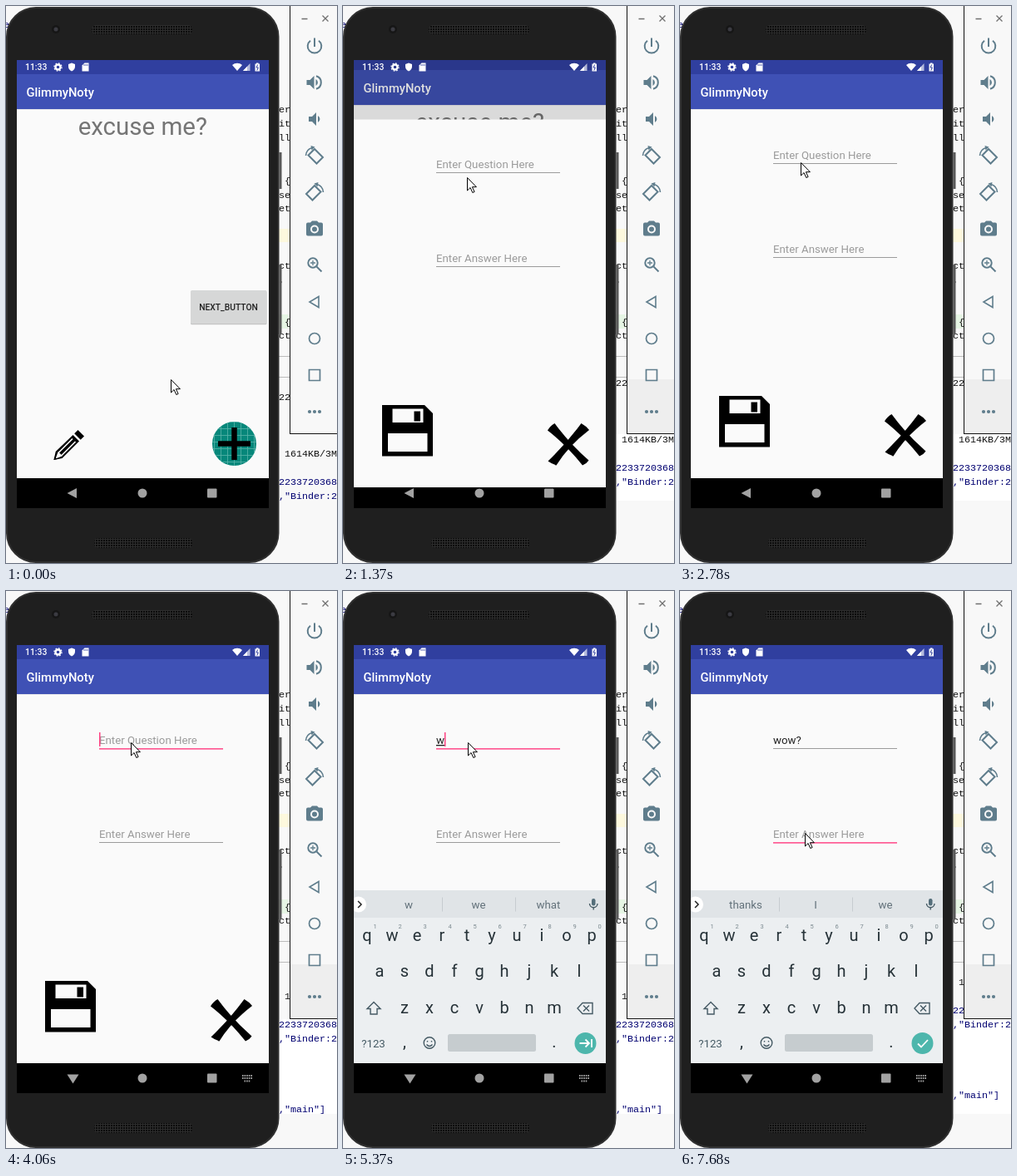
An HTML page for the animation above (8 s loop, 398 px wide and 670 px high).

```html
<!DOCTYPE html>
<html lang="en">
<head>
<meta charset="utf-8">
<title>Flash card emulator</title>
<style>
html, body { margin: 0; width: 100%; height: 100%; overflow: hidden; background: #f8f8f8; }
svg { display: block; width: 100vw; height: 100vh; font-family: Roboto, sans-serif; }
.mono { font: 11.7px "Liberation Mono", monospace; fill: #111; white-space: pre; }
.navy { fill: #000070; }
.mid { text-anchor: middle; }
.bold { font-weight: 500; }
.field { font-size: 13.26px; fill: #9b9b9b; }
.line { fill: none; stroke-width: 2; }
.keys { font-size: 20px; fill: #263238; }
</style>
</head>
<body>
<svg viewBox="0 0 398 670" preserveAspectRatio="none">
  <defs>
    <clipPath id="screen"><rect x="13" y="65" width="303" height="539"/></clipPath>
    <clipPath id="reveal"><rect id="revealBox" x="13" y="65" width="303" height="539"/></clipPath>
    <clipPath id="console"><rect x="320" y="447" width="78" height="200"/></clipPath>
    <clipPath id="disc"><circle cx="274.5" cy="526.5" r="26.5"/></clipPath>
    <pattern id="mesh" width="3" height="3" patternUnits="userSpaceOnUse">
      <rect width="3" height="3" fill="#2c2c2c"/><rect width="2" height="2" fill="#0c0c0c"/>
    </pattern>
    <pattern id="grid" x="2" y="4" width="8" height="8" patternUnits="userSpaceOnUse">
      <path d="M0 .5H8M.5 0V8" stroke="#58b3a8" stroke-width=".8"/>
    </pattern>
  </defs>

  <rect width="398" height="670" fill="#f8f8f8"/>
  <rect id="paper" x="300" y="515" width="98" height="80" fill="#fff"/>
  <rect x="320" y="268" width="24" height="16" fill="#fdf8dd"/>
  <rect x="320" y="371" width="24" height="17" fill="#e6f5e4"/>
  <path d="M320 421.5h24M320 446.5h24" stroke="#bbb"/>
  <g id="code"></g>
  <g clip-path="url(#console)"><g id="log"></g></g>
  <text class="mono navy" x="-3" y="26">e</text>

  <!-- phone body -->
  <path d="M330 176v44M330 311v84" stroke="#5a5a5a" stroke-width="3"/>
  <rect x="1" y="2" width="326.5" height="667" rx="35" fill="#1f1f1f" stroke="#303030" stroke-width="2"/>
  <circle cx="60" cy="28" r="5" fill="#161616"/><circle cx="60" cy="28" r="2.5" fill="#3b3b42"/>
  <rect x="103" y="23" width="121" height="11" rx="5" fill="url(#mesh)"/>
  <rect x="106" y="640" width="118" height="12" rx="5" fill="url(#mesh)"/>

  <g clip-path="url(#screen)">
    <rect x="13" y="65" width="303" height="539"/>
    <g id="deck"></g>
    <rect id="dim" x="13" y="65" width="303" height="503"/>
    <g clip-path="url(#reveal)"><g id="form"></g></g>
    <g id="keyboard"></g>
    <g id="navIcons">
      <path id="back"/>
      <circle cx="164" cy="586" r="5.5"/>
      <rect x="242" y="580.5" width="11.5" height="11" rx="1"/>
      <path id="imeIcon" d="M284 583h12M284 586h12M286.5 589.5h7" stroke="#a2a2a2" stroke-width="1.8" stroke-dasharray="1.6 1"/>
    </g>
    <g fill="#fff">
      <text class="bold" x="23" y="77.3" font-size="10.4">11:33</text>
      <circle cx="62.5" cy="73.5" r="3" fill="none" stroke="#fff" stroke-width="2.4"/>
      <circle cx="62.5" cy="73.5" r="4.6" fill="none" stroke="#fff" stroke-width="1.2" stroke-dasharray="1.8 1.8"/>
      <path d="M79 68.5l4 1.6v3c0 2.5-1.6 4.4-4 5.4-2.4-1-4-2.9-4-5.4v-3z"/>
      <path d="M94.5 68.5h5v10h-8v-7z"/>
      <path d="M94 70v2M96 70v2M98 70v2" stroke="#303f9f" stroke-width=".8"/>
      <path d="M278 78l-6-7a9 9 0 0 1 12 0z"/>
      <path d="M285 78h8.5v-9z" opacity=".65"/><path d="M285 78h5v-5.3z"/>
      <path d="M299.5 69.5h1.5v-1h2.5v1h1.5v9h-5.5z"/>
      <path d="M302.7 70.5l-1.7 3.5h2.4l-1.6 3.5" fill="none" stroke="#303f9f"/>
    </g>
  </g>

  <!-- emulator toolbar -->
  <rect x="341.5" y="-1" width="60" height="515.5" fill="#f8f8f8" stroke="#111"/>
  <rect id="shade" x="342" y="449" width="56" height="65" fill="#eee"/>
  <path d="M355.5 15.5h7M380.5 11.5l7 7m0-7l-7 7" stroke="#707070" stroke-width="1.3"/>
  <g id="tools" fill="#5f7d8c" stroke="#5f7d8c" stroke-width="0"></g>

  <path id="mouse" d="M.5.5v15.5l3.6-3.5 2.7 6 2.3-1-2.7-5.8h5z" fill="#fff" stroke="#000"/>
</svg>
<script>
const $ = id => document.getElementById(id);
const set = (id, attrs) => { for (const k in attrs) $(id).setAttribute(k, attrs[k]); };
const show = (id, on) => set(id, { visibility: on ? 'visible' : 'hidden' });
const text = (x, y, s, cls = '', more = '') => `<text x="${x}" y="${y}" class="${cls}" ${more}>${s}</text>`;
const box = (x, y, w, h, fill, rx = 0) => `<rect x="${x}" y="${y}" width="${w}" height="${h}" fill="${fill}" rx="${rx}"/>`;
const path = (d, more = '') => `<path d="${d}" ${more}/>`;

const appFrame = box(13, 65, 303, 17, '#303f9f') + box(13, 123, 303, 445, '#fafafa') +
  box(13, 124, 303, 1, '#e6e6ea') + box(13, 82, 303, 42, '#3f51b5') +
  text(24.5, 108.5, 'GlimmyNoty', 'bold', 'font-size="14.74" fill="#fff"');

$('deck').innerHTML = appFrame +
  text(164.3, 155, 'excuse me?', 'mid', 'font-size="29.5" fill="#757575"') +
  box(222, 343, 91.5, 40.3, '#c4c4c4', 1.5) + box(222, 342, 91.5, 40, '#d6d7d7', 1.5) +
  text(267.5, 366, 'NEXT_BUTTON', 'mid bold', 'font-size="10.3" fill="#212121"') +
  path('M86.5 510l7.5 7.5-4.3 4.3-7.5-7.5zM80.5 516l7.5 7.5-20.5 20.5-10 2 2.2-10z') +
  path('M63 537.5l17-17M66.5 541l17-17M61 543l2-5.5 3.5 3.5z', 'stroke="#fafafa" stroke-width="1.7" fill="#fafafa"') +
  path('M57.5 546l1-4 3 3z') +
  '<g clip-path="url(#disc)">' + box(247, 499, 55, 55, '#07877a') + box(247, 499, 55, 55, 'url(#grid)') + '</g>' +
  path('M255 526.5h39M274.5 507v39', 'stroke="#000" stroke-width="6.5"');

const field = (id, y, hint) =>
  text(112, y, hint, 'field', `id="${id}Text"`) + box(112, y + 5, 149, 1, '#9b9b9b').replace('<rect', `<rect id="${id}Line"`);

$('form').innerHTML = appFrame +
  field('ask', 184, 'Enter Question Here') + field('reply', 297, 'Enter Answer Here') +
  '<rect id="caret" width="1.5" height="17" fill="#ff4081"/>' +
  path('M47 469h51l10 10v51.5h-61z') + box(59.5, 473.5, 37, 16.5, '#fafafa') + box(85.5, 476.5, 7.5, 12, '#000') +
  box(54, 503, 47.5, 22, '#fafafa') +
  path('M254.5 491q-5 2.5-8.5 8.5 22 17 42 42 5-2 7.5-6-23-20-41-44.500z') +
  path('M286.5 491q5.500 3 9.500 8-25 19-39.500 42.500-5-1.500-10-5 22-21 40-45.500z');

// Keyboard
const row = (letters, x, y) => [...letters].map((c, i) => text(x + 30 * i, y, c, 'mid keys')).join('');
const digits = [...'1234567890'].map((c, i) =>
  text(38.5 + 30 * i, 406, c, 'mid', 'font-size="7.5" fill="#7b898f"')).join('');
const stroked = 'fill="none" stroke="#455a64" stroke-width="1.4"';
$('keyboard').innerHTML = box(13, 360, 303, 208, '#eceff1') + box(13, 360, 303, 33, '#e0e4e7') +
  '<circle cx="18.5" cy="377" r="9.5" fill="#fff"/>' + path('M18 373l4 4-4 4', 'fill="none" stroke="#222" stroke-width="1.5"') +
  path('M119.5 368.5v17M207.5 368.5v17', 'stroke="#c6ccd0"') +
  [79, 163, 247].map((x, i) => text(x, 381.8, '', 'mid', `id="hint${i}" font-size="13.3" fill="#62717a"`)).join('') +
  box(299, 370, 4.5, 8.5, '#546e7a', 2.2) + path('M296.5 376a4.7 4.7 0 0 0 9.5 0M301.2 380.5v3', stroked) +
  row('qwertyuiop', 29, 420.5) + digits + row('asdfghjkl', 44, 464) + row('zxcvbnm', 74, 508) +
  path('M37 494.5l-8 8h4v6.5h8v-6.5h4z', stroked) +
  path('M288 495.5h12v13h-12l-6-6.5zM289 498.5l7 7m0-7l-7 7', stroked) +
  text(36.5, 548.5, '?123', 'mid', 'font-size="13.3" fill="#455a64"') +
  text(74, 549, ',', 'mid keys') + text(254, 549, '.', 'mid keys') +
  `<circle cx="104" cy="543.5" r="6.8" ${stroked}/>` +
  path('M101.5 541v1.5M106.5 541v1.5M100.5 545.5q3.5 4 7 0', stroked) +
  box(126, 533, 106, 21, '#c6cccf', 2.5) +
  '<circle cx="291.5" cy="544" r="13" fill="#4db6ac"/>' +
  path('', 'id="enter" fill="none" stroke="#fff" stroke-width="1.8"');

// Editor and console scraps behind the windows
const scraps = [['er', 124], ['ity', 141], ['lli', 158], [' {', 210], ['se', 227], ['etT', 243],
  ['ct', 312], [',', 329], [' {', 380], ['ct', 396]];
$('code').innerHTML = scraps.map(([s, y]) => text(328, y + 4, s, 'mono')).join('');
const logLines = [['22', 470], [' 1614KB/3M', 538], ['2233720368', 572, 'navy'],
  [',"Binder:2', 589, 'navy'], [',"main"]', 674, 'navy']];
$('log').innerHTML = logLines.map(([s, y, c = '']) => text(328, y + 4, s, 'mono ' + c)).join('');

// Toolbar icons, each centred on its own spot
const speaker = x => path(`M${x} -3h4l5-5v16l-5-5h-4z`);
const turn = path('M0 -8l10 10-7.5 7.5-10-10z', 'class="line"') +
  path('M-10.5 0A10.5 10.5 0 0 1 -3 -9.5', 'class="line" style="stroke-width:1.6"') +
  path('M-4.5 -12l5 1.5-4 4z');
const tools = [
  [48, path('M-5 -6.3A8.3 8.3 0 1 0 5 -6.3M0 -9.5V1', 'class="line"')],
  [92, speaker(-9.5) + path('M1.5 -4a4.5 4.5 0 0 1 0 8z') + path('M2 -7.7a8 8 0 0 1 0 15.4', 'class="line"')],
  [136, speaker(-7) + path('M4 -4a4.5 4.5 0 0 1 0 8z')],
  [180, turn],
  [224, `<g transform="scale(-1 1)">${turn}</g>`],
  [268, path('M-3 -9.5h6l2 2h3q2 0 2 2v12q0 2-2 2h-16q-2 0-2-2v-12q0-2 2-2h3z') +
    '<circle cy="0.5" r="4" fill="none" stroke="#f8f8f8" stroke-width="2"/>'],
  [311, '<circle cx="-2" cy="-2" r="5.7" class="line"/>' + path('M2.5 2.5l6 6', 'class="line"') +
    path('M-5 -2h6M-2 -5v6', 'class="line" style="stroke-width:1.3"')],
  [356, path('M5 -6.5V6.5L-6 0z', 'class="line" style="stroke-width:1.6"')],
  [400, '<circle r="6.5" class="line" style="stroke-width:1.7"/>'],
  [444, path('M-6.5 -6.5h13v13h-13z', 'class="line" style="stroke-width:1.7"')],
  [488, [-6, 0, 6].map(x => `<circle cx="${x}" r="2.1"/>`).join('')]
];
$('tools').innerHTML = tools.map(([y, s]) => `<g transform="translate(371 ${y})">${s}</g>`).join('');

// Step tables: start time, then values
const mouseSteps = [[0, 198, 449], [140, 190, 410], [280, 178, 350], [410, 166, 290], [550, 157, 245],
  [690, 151, 215], [820, 149, 206], [1810, 143, 205], [1950, 134, 202], [2090, 126, 199], [2220, 123, 197],
  [2360, 128, 195], [2500, 137, 193], [2640, 143, 190], [2780, 145, 188], [2930, 147, 185], [3070, 150, 182],
  [6190, 150, 195], [6320, 150, 225], [6450, 151, 258], [6580, 151, 284], [6710, 151, 289], [6840, 150, 291]];
const scrollSteps = [[0, 0, 0], [140, 17, 80], [3070, 51, 114], [7250, 68, 114]];
// time, form offset, reveal top, deck offset, dim
const openSteps = [[0, 22, 604, 0, 0], [1210, 21, 400, -1, .03], [1370, 11, 136.5, -5, .13], [1510, 0, 65, 0, 0]];
const keyboardSteps = [[0, 209, 0], [5040, 52.5, .52], [5200, 0, 1]];
const typeSteps = [[0, ''], [5370, 'w'], [5500, 'wo'], [5640, 'wow'], [5770, 'wow?']];
const caretSteps = [[0, 0], [3210, 1], [3620, 0], [4060, 1], [4350, 0], [5200, 1], [6040, 0],
  [6190, 1], [6450, 0], [6710, 1], [6980, 0], [7250, 1], [7680, 0]];
const guesses = { w: ['w', 'we', 'what'], wo: ['wo', 'would', 'work'], wow: ['wow', 'wow!', 'wows'] };
const at = (steps, t) => steps.findLast(s => t >= s[0]).slice(1);
const shift = (id, x, y) => set(id, { transform: `translate(${x} ${y})` });
const underline = (id, focused) =>
  set(id, { fill: focused ? '#ff5c94' : '#9b9b9b', height: focused ? 1.7 : 1 });

function draw(t) {
  shift('mouse', ...at(mouseSteps, t));

  const [scroll, paper] = at(scrollSteps, t);
  shift('log', 0, -scroll);
  set('paper', { height: paper });
  show('shade', t >= 140);

  const [rise, top, lift, dim] = at(openSteps, t);
  shift('form', 0, rise);
  shift('deck', 0, lift);
  set('revealBox', { y: top });
  set('dim', { opacity: dim });

  const [drop, alpha] = at(keyboardSteps, t);
  shift('keyboard', 0, drop);
  set('keyboard', { opacity: alpha });
  const imeUp = t >= 4060;
  set('back', { d: imeUp ? 'M73.5 581.5h14l-7 11z' : 'M85 580v12l-11.5-6z' });
  show('imeIcon', imeUp);
  set('navIcons', { fill: alpha > 0 && alpha < 1 ? '#ececec' : '#a2a2a2' });

  const [typed] = at(typeSteps, t);
  const [caretOn] = at(caretSteps, t);
  const onReply = t >= 7250;
  $('askText').textContent = typed || 'Enter Question Here';
  set('askText', {
    style: typed ? 'fill:#212121' : '',
    'text-decoration': typed in guesses ? 'underline' : 'none'
  });
  underline('askLine', t >= 3210 && !onReply);
  underline('replyLine', onReply);
  const width = typed && !onReply ? $('askText').getComputedTextLength() : 0;
  set('caret', { x: 112 + width, y: onReply ? 284 : 170 });
  show('caret', caretOn);

  (guesses[typed] || ['thanks', 'I', 'we']).forEach((s, i) => $('hint' + i).textContent = s);
  set('enter', { d: onReply ? 'M286 544.5l4 4 8-8.5' : 'M284.5 544h11M291.5 539.5l4.5 4.5-4.5 4.5M299 539v10' });
}

const start = performance.now();
function tick() {
  draw((performance.now() - start) % 8000);
  requestAnimationFrame(tick);
}
tick();
</script>
</body>
</html>
```
